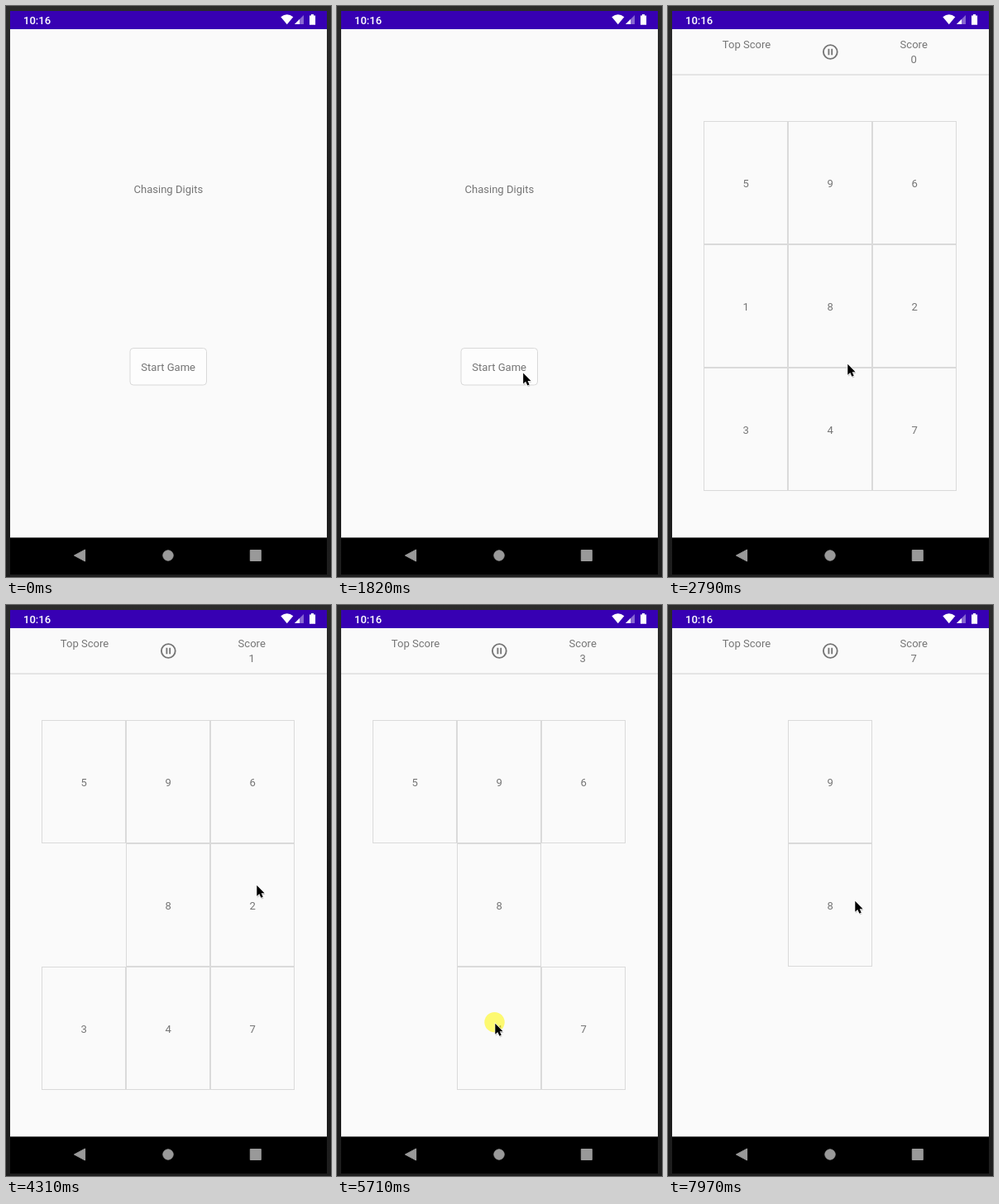
These frames come from a looping animation (393 px wide and 690 px high, 8000 ms). An HTML page:

```html
<!DOCTYPE html>
<html lang="en">
<head>
<meta charset="utf-8">
<title>Number game</title>
<style>
  html, body { margin: 0; width: 100%; height: 100%; overflow: hidden; background: #1c1c1c; }
  svg { display: block; width: 393px; height: 690px; }
  text { font: 13.05px Roboto, sans-serif; fill: #757575; text-anchor: middle; }
  .clock { font-weight: 500; fill: #fff; text-anchor: start; }
  .tile rect { fill: none; stroke: #dadada; }
</style>
</head>
<body>
<svg viewBox="0 0 393 690">
  <defs>
    <clipPath id="screen"><rect x="5" y="6" width="383" height="681"/></clipPath>
    <linearGradient id="edge" x2="0" y2="1">
      <stop offset="0" stop-color="#2b2b2b"/>
      <stop offset=".5" stop-color="#161616"/>
      <stop offset="1" stop-color="#1e1e1e"/>
    </linearGradient>
    <g id="window">
      <rect x="5" y="6" width="383" height="681"/>
      <rect x="5" y="6" width="383" height="22" fill="#3700b3"/>
      <rect x="5" y="28" width="383" height="614.4" fill="#fafafa"/>
    </g>
  </defs>
  <rect width="393" height="690" fill="url(#edge)"/>

  <g clip-path="url(#screen)">
    <use href="#window"/>
    <text x="196.3" y="225.5">Chasing Digits</text>
    <rect x="150" y="413.5" width="92.5" height="44.5" rx="4" fill="#fdfdfd" stroke="#d9d9d9"/>
    <text x="196.2" y="441">Start Game</text>
    <rect id="shade" x="5" y="6" width="383" height="636"/>

    <g id="game">
      <use href="#window"/>
      <text x="95" y="51">Top Score</text>
      <text x="297.2" y="51">Score</text>
      <text id="score" x="297.2" y="69">0</text>
      <g fill="none" stroke="#757575" stroke-width="1.85">
        <circle cx="196.3" cy="55.5" r="8.4"/>
        <path d="M194.4 51.8v7.4M198.2 51.8v7.4"/>
      </g>
      <rect x="5" y="82.3" width="383" height="1.5" fill="#dedede"/>
      <g id="board"></g>
    </g>

    <g fill="#fff">
      <text class="clock" x="21" y="22">10:16</text>
      <path d="M332.3 13.2Q339.8 7.2 347.3 13.2L339.8 22.3Z"/>
      <path d="M360 11V22H349Z" opacity=".4"/>
      <path d="M355 16V22H349Z"/>
      <path d="M367 11.6h2v-1.6h3v1.6h2.1v11.2h-7.1z"/>
    </g>
    <rect id="bar" x="5" width="383" height="56" fill="#e0e0e0"/>
    <g fill="#999" stroke="#999" stroke-linejoin="round">
      <path d="M82.4 664L95.6 657V671Z"/>
      <circle cx="196" cy="664" r="6.2"/>
      <rect x="295.3" y="657.5" width="13" height="13"/>
    </g>
  </g>

  <g id="pointer">
    <circle id="press" cx="-.5" cy="-.8" r="12.2" fill="#fff700" fill-opacity=".55"/>
    <g transform="translate(.3 .8) scale(.93)">
      <path d="M.6 1.5V16L4 13 6.2 18 9 16.8 6.8 12H11Z" opacity=".18"/>
      <path d="M0 0V14L3.2 11.1 5.5 16.2 8 15.1 5.8 10.1H10Z" stroke="#fff" stroke-width="1.2" paint-order="stroke"/>
    </g>
  </g>
</svg>

<script>
const LOOP = 8000, ENTER = 410, OPEN = 1930;
const $ = id => document.getElementById(id);

// Where the hand goes; hit is the digit pressed there, 0 being the start button.
const stops = [
  { leave: 410, arrive: 1190, x: 228, y: 447, hit: 0 },
  { leave: 1420, arrive: 2560, x: 217, y: 432 },
  { leave: 2790, arrive: 2970, x: 103, y: 389, hit: 1 },
  { leave: 3480, arrive: 4270, x: 303, y: 338, hit: 2 },
  { leave: 4540, arrive: 5090, x: 102, y: 496, hit: 3 },
  { leave: 5330, arrive: 5650, x: 191, y: 505, hit: 4 },
  { leave: 5830, arrive: 6150, x: 98, y: 225, hit: 5 },
  { leave: 6390, arrive: 6760, x: 268, y: 212, hit: 6 },
  { leave: 7040, arrive: 7540, x: 272, y: 510, hit: 7 },
  { leave: 7780, arrive: 7970, x: 226, y: 357 }
];

// Each press ends shortly before the hand moves on.
const presses = stops.flatMap(({ hit }, i) => {
  if (hit === undefined) return [];
  const leave = stops[i + 1].leave;
  return [{ hit, down: leave - 160, up: leave - 30 }];
});

const span = (t, from, length) => Math.min(1, Math.max(0, (t - from) / length));
const smooth = k => k * k * (3 - 2 * k);
const show = (el, on) => el.setAttribute('visibility', on ? 'visible' : 'hidden');
const move = (el, x, y) => el.setAttribute('transform', `translate(${x} ${y})`);

const tiles = [];
[...'596182347'].forEach((n, i) => {
  const x = 43 + i % 3 * 102, y = 139 + Math.floor(i / 3) * 149;
  $('board').insertAdjacentHTML('beforeend',
    `<g class="tile"><rect x="${x + .5}" y="${y + .5}" width="101" height="148"/>` +
    `<text x="${x + 51.2}" y="${y + 80}">${n}</text></g>`);
  tiles[n] = $('board').lastChild;
});

// The game window rises while its action bar slides away.
function drawWindow(t) {
  const alpha = span(t, OPEN, 140);
  const offset = 28 * (1 - span(t, OPEN, 530)) ** 2;
  const lift = 84 * smooth(span(t, OPEN + 130, 230));
  $('shade').setAttribute('opacity', .12 * alpha);
  $('game').setAttribute('opacity', alpha);
  move($('game'), 0, offset);
  $('bar').setAttribute('opacity', alpha);
  $('bar').setAttribute('y', 28 + offset - lift);
}

function drawScore(t) {
  const score = Math.max(0, ...presses.filter(p => t >= p.up).map(p => p.hit));
  $('score').textContent = score;
  tiles.forEach((tile, n) => show(tile, n > score));
}

function drawPointer(t) {
  let x = 386, y = 682;
  for (const s of stops) {
    const k = smooth(span(t, s.leave, s.arrive - s.leave));
    x += (s.x - x) * k;
    y += (s.y - y) * k;
  }
  show($('pointer'), t >= ENTER);
  move($('pointer'), x, y);
  show($('press'), presses.some(p => t >= p.down && t < p.up));
}

const start = performance.now();
function tick() {
  const t = (performance.now() - start) % LOOP;
  drawWindow(t);
  drawScore(t);
  drawPointer(t);
  requestAnimationFrame(tick);
}
tick();
</script>
</body>
</html>
```
